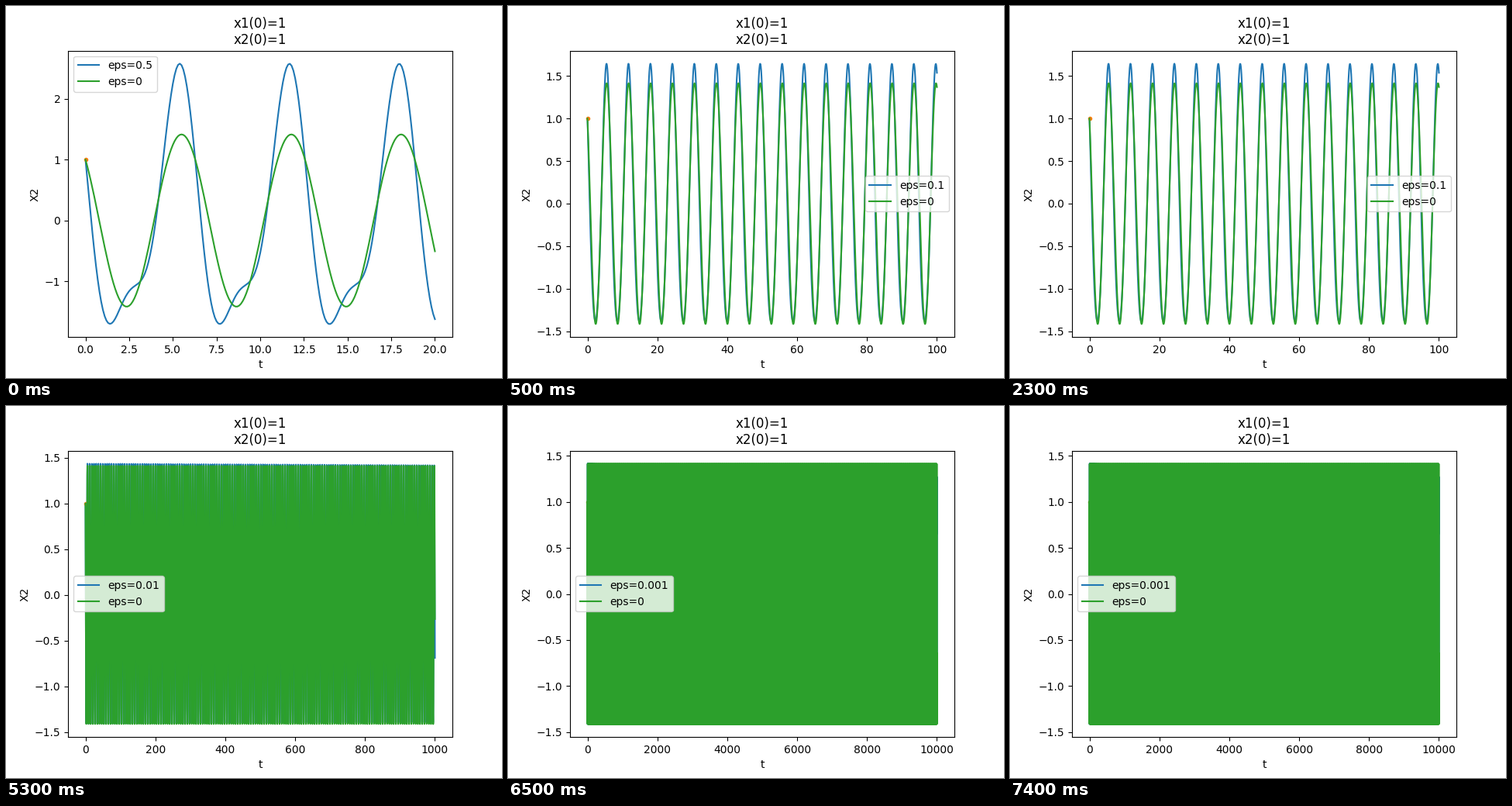
Animation of 640 by 480 pixels, one loop 8 s. Source, as a matplotlib script:

```python
import numpy as np
import matplotlib.pyplot as plt
from matplotlib.animation import FuncAnimation

STEP = 500  # ms per frame
# eps, end time, legend place, frames shown
STAGES = [
    ("0.5", 20, "upper left", 1),
    ("0.1", 100, "center right", 6),
    ("0.01", 1000, "center left", 6),
    ("0.001", 10000, "center left", 3),
]
DRIFT = 3.07e-4   # phase error of the integrator per unit time
DECAY = 1.07e-5   # amplitude loss of the integrator per unit time

order = [i for i, stage in enumerate(STAGES) for _ in range(stage[3])]

fig, ax = plt.subplots(figsize=(6.4, 4.8), dpi=100)


def free(t):
    return np.cos(t) - np.sin(t)


def perturbed(t, eps):
    """Drifting free oscillation plus the second harmonic of the forcing."""
    k = 4 / 3 * eps
    phase = (1 + DRIFT) * t
    swing = np.cos(phase) - (1 + k) * np.sin(phase)
    return np.exp(-DECAY * t) * swing - k * np.sin(2 * t)


def draw_stage(label, end, place):
    t = np.linspace(0, end, 10 * end + 1)
    ax.clear()
    ax.plot(t, perturbed(t, float(label)), color="C0", label=f"eps={label}")
    ax.plot([0], [1], ".", color="C1")
    ax.plot(t, free(t), color="C2", label="eps=0")
    ax.set_title("x1(0)=1\nx2(0)=1")
    ax.set_xlabel("t")
    ax.set_ylabel("X2")
    ax.legend(loc=place)


def update(frame):
    draw_stage(*STAGES[order[frame]][:3])
    return []


anim = FuncAnimation(fig, update, frames=len(order), init_func=lambda: update(0),
                     interval=STEP, repeat=True, repeat_delay=0)
plt.show()
```
